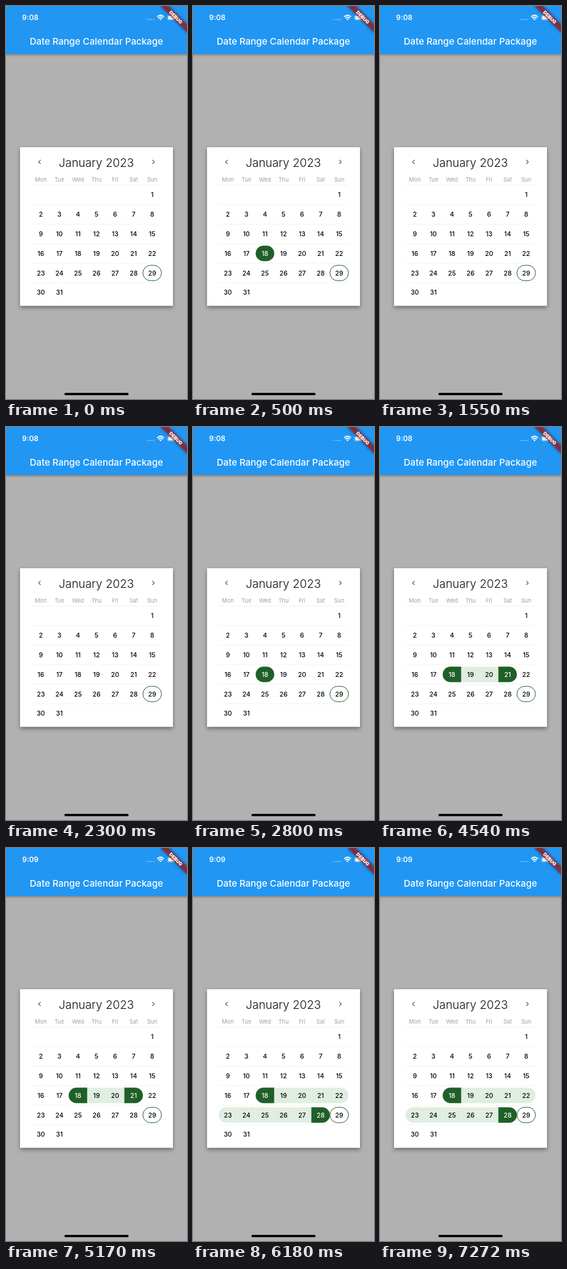
Recreate the animation shown at these times as an HTML page. Size 296 by 640 pixels, loop 8 s.

```html
<!DOCTYPE html>
<html lang="en">
<head>
<meta charset="utf-8">
<title>Date range calendar</title>
<style>
  html, body { margin: 0; width: 100%; height: 100%; overflow: hidden; background: #b1b1b1; }
  svg { display: block; width: 296px; height: 640px; font-family: Inter, "Noto Sans", sans-serif; }
  text { text-anchor: middle; }
  .bar { fill: #2196f3; filter: drop-shadow(0 1.5px 2px #0006); }
  .card { fill: #fff; filter: drop-shadow(0 3px 3px #0006); }
  .clock { font-size: 11.8px; font-weight: 600; fill: #fff; }
  .title { font-size: 15.1px; font-weight: 500; fill: #fff; }
  .month { font-size: 18.9px; font-weight: 300; fill: #111; }
  .weekday { font-size: 9.2px; fill: #a0a0a0; }
  .day { font-size: 10.5px; font-weight: 500; fill: #000; }
  .day.end { fill: #fff; }
  .rule { stroke: #f2f2f2; }
  .line { fill: none; stroke: #555; stroke-width: 1.2; }
  .wifi { fill: none; stroke: #fff; stroke-width: 1.9; }
  .debug { font-size: 7.7px; font-weight: 900; fill: #fff; }
</style>
</head>
<body>
<svg viewBox="0 0 296 640">
  <rect width="296" height="640" fill="#b1b1b1"/>
  <rect class="bar" x="-5" y="-5" width="306" height="83"/>
  <text class="clock" id="clock" x="39.7" y="23.2"></text>
  <text class="title" x="147.8" y="62.5">Date Range Calendar Package</text>

  <g fill="#fff" fill-opacity=".45">
    <circle cx="231" cy="22" r="1.1"/><circle cx="234.5" cy="22" r="1.1"/>
    <circle cx="238" cy="22" r="1.1"/><circle cx="241.5" cy="22" r="1.1"/>
  </g>
  <path class="wifi" d="M247.2 17.6Q252.7 12.4 258.2 17.6M249.2 20Q252.7 16.7 256.2 20"/>
  <path d="M250.8 21.4Q252.7 19.8 254.6 21.4L252.7 23.3Z" fill="#fff"/>
  <rect x="263.9" y="14.4" width="18" height="8.8" rx="2.6" fill="none" stroke="#fff" stroke-opacity=".4" stroke-width=".8"/>
  <rect x="265.2" y="15.7" width="15.4" height="6.2" rx="1.5" fill="#fff"/>

  <g transform="translate(296 0) rotate(45)">
    <rect x="-30.4" y="21.2" width="60.8" height="9.2" fill="#000" fill-opacity=".5" style="filter:blur(2.5px)"/>
    <rect x="-30.4" y="21.2" width="60.8" height="9.2" fill="#b71c1c" fill-opacity=".627"/>
    <text class="debug" y="28.6">DEBUG</text>
  </g>

  <rect class="card" x="23" y="230" width="250" height="258.3"/>
  <path class="line" d="M56.6 250.6L53.3 253.9L56.6 257.2M239.2 250.6L242.5 253.9L239.2 257.2"/>
  <text class="month" x="147.8" y="261.8">January 2023</text>
  <g id="rules"></g>
  <g id="range"></g>
  <g id="days"></g>
  <rect x="95.5" y="630" width="105" height="3.8" rx="1.9" fill="#000"/>
</svg>
<script>
const LOOP = 8000, CELL = 30.35, LEFT = 41.8, HALF = 12.6, TODAY = 29;
const DARK = '#1f5f28', LIGHT = '#dfeee1';
const $ = id => document.getElementById(id);

// Selected dates and clock, each valid from its start time.
const steps = [
  { at: 0, clock: '9:08' },
  { at: 500, clock: '9:08', from: 18, to: 18 },
  { at: 1550, clock: '9:08' },
  { at: 2800, clock: '9:08', from: 18, to: 18 },
  { at: 4540, clock: '9:08', from: 18, to: 21 },
  { at: 5170, clock: '9:09', from: 18, to: 21 },
  { at: 6180, clock: '9:09', from: 18, to: 28 }
];

function add(parent, tag, attrs, text = '') {
  const el = document.createElementNS('http://www.w3.org/2000/svg', tag);
  for (const key in attrs) el.setAttribute(key, attrs[key]);
  el.textContent = text;
  return parent.appendChild(el);
}

// The first day of the month falls in the last column.
const place = day => {
  const col = (day + 5) % 7, row = Math.floor((day + 5) / 7);
  return { col, row, x: LEFT + col * CELL, y: 307.3 + row * 31.88 };
};

function cell(day, fill, roundLeft, roundRight, stroke = 'none') {
  const { x, y } = place(day), a = roundLeft ? HALF : 0, b = roundRight ? HALF : 0;
  const d = `M${x + a} ${y - HALF}H${x + CELL - b}a${b} ${b} 0 0 1 ${b} ${b}V${y + HALF - b}` +
    `a${b} ${b} 0 0 1 ${-b} ${b}H${x + a}a${a} ${a} 0 0 1 ${-a} ${-a}V${y - HALF + a}a${a} ${a} 0 0 1 ${a} ${-a}Z`;
  add($('range'), 'path', { d, fill, stroke });
}

['Mon', 'Tue', 'Wed', 'Thu', 'Fri', 'Sat', 'Sun'].forEach((name, i) =>
  add($('days'), 'text', { class: 'weekday', x: LEFT + (i + .5) * CELL, y: 286 }, name));
for (let row = 0; row < 6; row++) {
  const y = 291.5 + row * 31.88;
  add($('rules'), 'path', { class: 'rule', d: `M${LEFT} ${y}H${LEFT + 7 * CELL}` });
}
const labels = Array.from({ length: 31 }, (_, i) => {
  const { x, y } = place(i + 1);
  return add($('days'), 'text', { class: 'day', x: x + CELL / 2, y: y + 3.7 }, i + 1);
});

function show({ clock, from, to }) {
  $('clock').textContent = clock;
  $('range').replaceChildren();
  for (let day = from; day <= to; day++) {
    const { col } = place(day), end = day === from || day === to;
    cell(day, end ? DARK : LIGHT, day === from || col === 0, day === to || col === 6);
  }
  cell(TODAY, 'none', true, true, DARK);
  labels.forEach((label, i) =>
    label.classList.toggle('end', i + 1 === from || i + 1 === to));
}

let current;
function frame() {
  const t = performance.now() % LOOP;
  const step = steps.findLast(s => s.at <= t);
  if (step !== current) show(current = step);
  requestAnimationFrame(frame);
}
frame();
</script>
</body>
</html>
```
